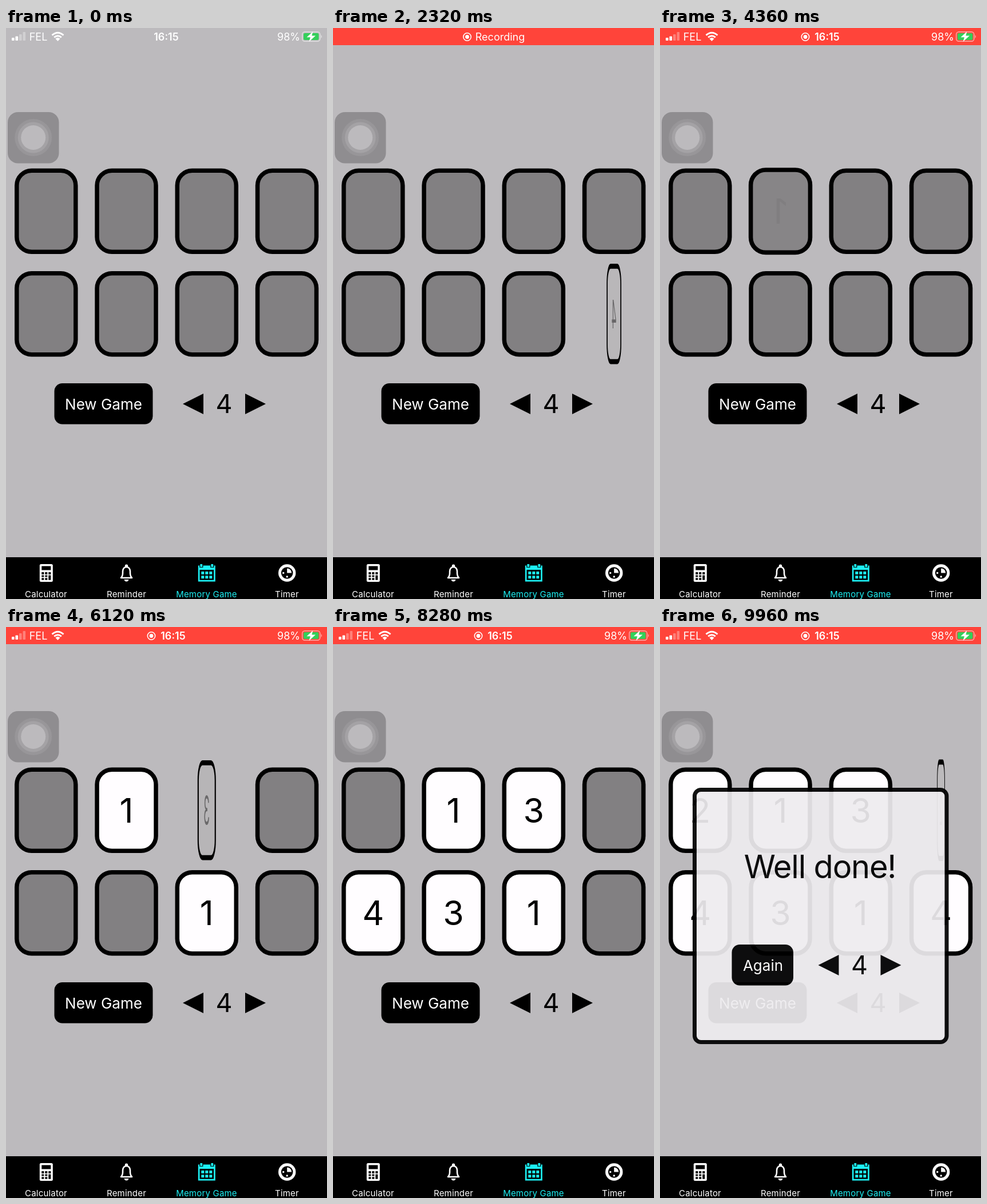
Write an HTML page that moves like this. It is 561 by 998 pixels and loops after 10000 ms.

```html
<!DOCTYPE html>
<html lang="en">
<head>
<meta charset="utf-8">
<title>Memory Game</title>
<style>
  html, body { margin: 0; width: 100%; height: 100%; overflow: hidden; background: #bcbabd; }
  svg { display: block; width: 561px; height: 998px; font-family: Inter, "Open Sans", sans-serif; }
  text { text-anchor: middle; }
  .tabs text { font-size: 15px; letter-spacing: .2px; }
  .status text { font-size: 18px; fill: #fff; }
  .num { font-size: 45px; }
  .btn { font-size: 26px; fill: #fff; }
  .face { font-size: 59px; }
</style>
</head>
<body>
<svg viewBox="0 0 561 998" xmlns="http://www.w3.org/2000/svg">
  <defs>
    <g id="arrows">
      <path d="M0 18L36 0V36ZM109 0L145 18L109 36Z"/>
      <text class="num" x="72" y="34">4</text>
    </g>
    <g id="rec">
      <circle r="6.7" fill="none" stroke="#fff" stroke-width="1.6"/>
      <circle r="3.4" fill="#fff"/>
    </g>
  </defs>
  <rect width="561" height="998" fill="#bcbabd"/>

  <rect id="bar" width="561" height="30"/>
  <g class="status">
    <g id="info">
      <g fill="#fff">
        <rect x="10" y="17" width="4.6" height="5" rx="1"/>
        <rect x="16.5" y="14.5" width="4.6" height="7.5" rx="1"/>
        <rect x="23" y="11" width="4.6" height="11" rx="1" opacity=".32"/>
        <rect x="29.5" y="7" width="4.6" height="15" rx="1" opacity=".32"/>
        <path d="M90.5 23L86.4 18.7Q90.5 15.4 94.6 18.7Z"/>
      </g>
      <text x="56.5" y="22">FEL</text>
      <path d="M80.5 12.6Q90.5 4 100.5 12.6M84.2 16.4Q90.5 11 96.8 16.4" fill="none" stroke="#fff" stroke-width="3"/>
      <text x="494" y="22">98%</text>
      <rect x="517.8" y="6.8" width="31" height="16.4" rx="4.5" fill="none" stroke="#fff" stroke-opacity=".55" stroke-width="1.5"/>
      <path d="M550.7 12Q553.4 15 550.7 18Z" fill="#fff" fill-opacity=".6"/>
      <rect x="520" y="9" width="26.5" height="12" rx="2.5" fill="#34cf5a"/>
      <path d="M536.5 6L525.5 16.3H532L529.5 24L541 13.6H534.4Z" fill="#fff"/>
    </g>
    <g id="clock"><text id="time" y="22" font-weight="600">16:15</text></g>
    <use id="dot" href="#rec" x="254" y="15.5"/>
    <g id="label">
      <use href="#rec" x="234.5" y="15.5"/>
      <text x="292" y="22">Recording</text>
    </g>
  </g>

  <rect x="3" y="147" width="89.5" height="89.5" rx="18" fill="#8f8d90"/>
  <g transform="translate(47.7 191.5)">
    <circle r="32.5" fill="#989699"/>
    <circle r="27" fill="#a4a2a5"/>
    <circle r="21.5" fill="#bcbabd"/>
  </g>

  <rect x="84.5" y="621" width="172" height="71.5" rx="14"/>
  <text class="btn" x="170.5" y="666.5">New Game</text>
  <use href="#arrows" x="309" y="639"/>

  <g id="cards"></g>

  <g class="tabs" fill="#fff">
    <rect y="925" width="561" height="73" fill="#000"/>
    <g transform="translate(70.3 952.5)">
      <rect x="-11.5" y="-15.5" width="23" height="31" rx="2.5"/>
      <path d="M-8 -12H8V-5H-8ZM-8 -1.5h4v4h-4zM-2 -1.5h4v4h-4zM4 -1.5h4v4h-4zM-8 3.9h4v3h-4zM-2 3.9h4v3h-4zM4 3.9h4v8.3h-4zM-8 8.8h4v3.4h-4zM-2 8.8h4v3.4h-4z" fill="#000"/>
    </g>
    <g transform="translate(210.5 952.5)">
      <path d="M-9.5 8.5Q-6.5 5.5 -6.5 0V-3Q-6 -10 0 -10.5Q6 -10 6.5 -3V0Q6.5 5.5 9.5 8.5Z" fill="none" stroke="#fff" stroke-width="2.6" stroke-linejoin="round"/>
      <circle cy="-12.2" r="2.7"/>
      <path d="M-4 11.5H4Q3 15 0 15T-4 11.5Z"/>
    </g>
    <g transform="translate(350.8 952.5)" fill="#1cf0f4">
      <path d="M-15 -13H15V15H-15ZM-12.3 -5.5V12.3H12.3V-5.5Z" fill-rule="evenodd"/>
      <path d="M-12 -16h5v6h-5zM7 -16h5v6h-5z" stroke="#000" stroke-width="1.2"/>
      <path d="M-9.5 -2.5h5v5h-5zM-2.5 -2.5h5v5h-5zM4.5 -2.5h5v5h-5zM-9.5 4.7h5v5h-5zM-2.5 4.7h5v5h-5zM4.5 4.7h5v5h-5z"/>
    </g>
    <g transform="translate(491.2 952.5)">
      <circle r="15.2"/>
      <circle r="10.3" fill="#000"/>
      <path d="M0 0V-8A8 8 0 0 1 8 0Z"/>
      <circle cx="-6.5" r="1.7"/>
      <circle cy="6.5" r="1.7"/>
    </g>
    <text x="70" y="994.5">Calculator</text>
    <text x="210.5" y="994.5">Reminder</text>
    <text x="350.5" y="994.5" fill="#1cf0f4">Memory Game</text>
    <text x="491" y="994.5">Timer</text>
  </g>

  <g id="panel" opacity=".925">
    <rect x="60.5" y="284.5" width="440.5" height="441" rx="11" fill="#eeecef" stroke="#000" stroke-width="7"/>
    <text x="279.5" y="438.5" font-size="56" letter-spacing="-1.2">Well done!</text>
    <rect x="125.5" y="555" width="107.5" height="71.5" rx="14"/>
    <text class="btn" x="180" y="600.5">Again</text>
    <use href="#arrows" x="276.5" y="573"/>
  </g>
</svg>
<script>
const LOOP = 10000, FLIP = 300, WIN = 9821, SWAP = 3400;
const $ = id => document.getElementById(id);
const clamp = v => Math.max(0, Math.min(1, v));
const ramp = (t, from, len) => clamp((t - from) / len);
const mix = (a, b, k) => a.map((v, i) => Math.round(v + (b[i] - v) * k));
const rgb = c => `rgb(${c})`;

const BG = [188, 186, 189], DIM = [232, 64, 56], RED = [255, 68, 58];
const BACK = [130, 128, 130], FRONT = [255, 253, 255];

// Each card: its number, then the times at which it turns over.
const deck = [
  [2, 9100], [1, 4348], [3, 5995], [2, 850, 2000, 9821],
  [4, 7500], [3, 3450, 4050, 6750], [1, 2800, 3900, 5150], [4, 1550, 2152, 8400]
];

const cards = deck.map(([face, ...turns], i) => {
  const x = 70.3 + (i % 4) * 140.25, y = i < 4 ? 320.2 : 499.8;
  $('cards').insertAdjacentHTML('beforeend',
    `<g><rect x="-51.5" y="-71" width="103" height="142" rx="26" stroke="#000" stroke-width="7.5"/>
     <text class="face" y="21.5">${face}</text></g>`);
  const g = $('cards').lastElementChild;
  return { g, box: g.children[0], text: g.children[1], turns, x, y };
});

function drawCard(c, t) {
  // Turns alternate between opening and closing.
  const p = c.turns.reduce((s, at, i) => s + (i % 2 ? -1 : 1) * ramp(t, at, FLIP), 0);
  const size = 1 + .2 * (1 - Math.abs(2 * p - 1));
  const sx = -Math.cos(Math.PI * p) * size;
  c.g.setAttribute('transform', `translate(${c.x} ${c.y}) scale(${sx.toFixed(4)} ${size.toFixed(4)})`);
  c.box.setAttribute('fill', rgb(mix(BACK, FRONT, p)));
  c.text.setAttribute('opacity', p.toFixed(3));
}

function drawStatus(t) {
  const red = mix(DIM, RED, ramp(t, 1400, 700));
  $('bar').setAttribute('fill', rgb(mix(BG, red, ramp(t, 40, 460))));
  const rec = ramp(t, 40, 300), back = ramp(t, SWAP, 300);
  const info = 1 - rec + back;
  $('info').setAttribute('opacity', info);
  $('clock').setAttribute('opacity', info);
  $('label').setAttribute('opacity', rec - back);
  $('dot').setAttribute('opacity', back);
  $('time').setAttribute('x', t < SWAP ? 280 : 292);
}

function draw(t) {
  drawStatus(t);
  cards.forEach(c => drawCard(c, t));
  $('panel').setAttribute('visibility', t < WIN ? 'hidden' : 'visible');
}

const start = performance.now();
function tick() {
  draw((performance.now() - start) % LOOP);
  requestAnimationFrame(tick);
}
tick();
</script>
</body>
</html>
```
